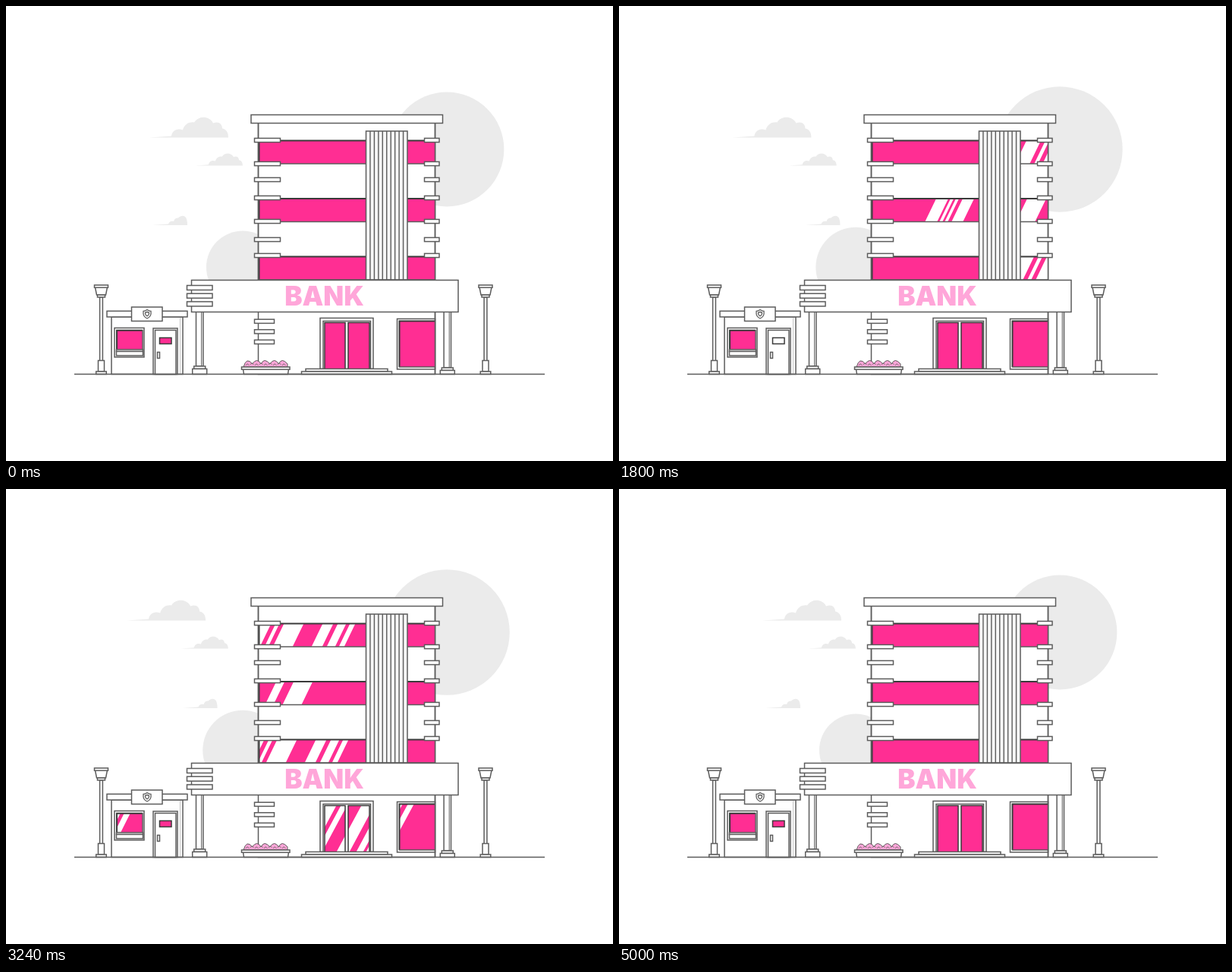
These frames come from a looping animation (800x600 px, 7000 ms). An HTML page:

```html
<!DOCTYPE html>
<html lang="en">
<head>
<meta charset="utf-8">
<title>Bank</title>
<style>
  html, body { margin: 0; width: 100%; height: 100%; overflow: hidden; background: #fff; }
  svg { display: block; width: 800px; height: 600px; }
  text { font: 900 35px Inter, "Open Sans", sans-serif; fill: #ffa6d9; }
</style>
</head>
<body>
<svg id="stage" viewBox="0 0 800 600"></svg>
<script>
const LOOP = 7000, END = 5000, STEP = 40, GROUND = 485.5;
const PINK = '#ff2e93', SOFT = '#ffa6d9', INK = '#5c5c5c', DARK = '#3a3a3a', GREY = '#ebebeb';
const stage = document.getElementById('stage');

function add(tag, attrs, parent = stage) {
  const el = document.createElementNS('http://www.w3.org/2000/svg', tag);
  for (const k in attrs) el.setAttribute(k, attrs[k]);
  parent.appendChild(el);
  return el;
}
const box = (x1, y1, x2, y2, fill = '#fff', stroke = INK) =>
  add('rect', { x: x1, y: y1, width: x2 - x1, height: y2 - y1, fill, stroke, 'stroke-width': 1.5 });
const line = (d, w = 1.5, stroke = INK, fill = 'none') =>
  add('path', { d, fill, stroke, 'stroke-width': w });
// Box around the centre line x, from y1 to y2
const post = (x, half, y1, y2) => box(x - half, y1, x + half, y2);
// Horizontal bar around the centre line y
const bar = (x1, x2, y, half = 2.6) => box(x1, y - half, x2, y + half);

// Sky
const sun = add('circle', { cx: 581, cy: 189, fill: GREY });
const moon = add('circle', { cx: 312, cy: 344.5, fill: GREY });
const puff = 'M0 0L29 -2C30 -9 36 -13 44 -10C46 -18 53 -21 59 -20C64 -29 79 -29 84 -19C91 -22 96 -18 96 -12C102 -11 104 -6 104 0Z';
const wisp = 'M0 0L21 -1.5C22 -5 25 -6 28 -5C29 -9 32 -10 34 -9.5C38 -14 44 -13 45 -8Q46 -5 46 0Z';
const cloud = (d, x, y, scale, reach) => ({ el: add('path', { d, fill: GREY }), x, y, scale, reach });
const clouds = [
  cloud(puff, 189, 173.5, 1, -41.5),
  cloud(puff, 249.5, 210.5, 0.6, -26.5),
  cloud(wisp, 193, 289, 1, 55)
];

/* Glass with slanted reflections. Bands are widths from the leading edge back,
   white and clear in turn; each launch sends them off from x, speeding up. */
const passes = [];
function glass(x1, y1, x2, y2, { runs, lean, x, gain, power, launches }) {
  const id = `clip${x1}-${y1}`;
  const area = { x: x1, y: y1, width: x2 - x1, height: y2 - y1 };
  add('rect', area, add('clipPath', { id }));
  const g = add('g', { 'clip-path': `url(#${id})` });
  add('rect', { ...area, fill: PINK }, g);
  let d = '', edge = 0;
  runs.forEach((w, i) => {
    if (i % 2 === 0) d += `M${edge} ${y2}l${lean} ${y1 - y2}h${-w}l${-lean} ${y2 - y1}Z`;
    edge -= w;
  });
  for (const launch of launches)
    passes.push({ el: add('path', { d, fill: '#fff' }, g), x, gain, power, launch });
}

// Main block
box(332.5, 154, 565.5, GROUND);
box(323, 143.5, 575.5, 154.5);

const outer = { runs: [7, 5, 11, 6, 14, 25, 26, 6, 5, 6, 19],
  lean: 15, x: 307, gain: 92, power: 2.25, launches: [0, 2040] };
const inner = { runs: [25, 12, 11, 47, 15, 5, 4, 3, 4, 3, 16],
  lean: 15, x: 315, gain: 40, power: 3, launches: [0, 2010] };
[outer, inner, { ...outer, x: outer.x - 9 }].forEach((shine, i) => {
  const y = 177 + i * 76.5, low = y + 31;
  glass(333, y, 565, low, shine);
  line(`M333.5 ${low}V${y + 0.5}H565`, 2, DARK);
  line(`M333 ${low}H565`);
});
line('M332.5 154V361M565.5 154V361');

// Fins
box(474.5, 165, 529, 361, '#f6f6f6');
for (let i = 1; i < 10; i++) line(`M${474.5 + i * 5.45} 165V361`, 1.4);

for (const y of [177, 208, 229, 253, 284, 308, 329]) {
  bar(327.5, 361.5, y);
  bar(551.5, 571, y);
}
for (let i = 0; i < 3; i++) bar(327.5, 353.5, 415.8 + i * 13.6);

// Entrance
box(414, 411.5, 484, 478.5);
box(418, 415.5, 480.5, 478.5);
for (const [a, b] of [[420, 447], [451, 479]]) {
  glass(a, 417, b, 478.5, { runs: [8, 4, 9, 9, 17, 19, 8, 6, 24],
    lean: 33, x: 375, gain: 152, power: 1.2, launches: [0, 2490] });
  line(`M${a} 478V417.5H${b}V478`, 1.5, DARK);
}
box(395, 478.5, 503, 482);
box(389.5, 482, 508.5, GROUND);

// Shop window
box(515.5, 412.5, 565.5, 479);
glass(518, 415, 565, 476, { runs: [8, 7, 10, 5, 11],
  lean: 33, x: 485, gain: 180, power: 1.2, launches: [600, 3080] });
line('M518.5 476V415.5H565', 2, DARK);
line('M518 476H565M565.5 403V485');

// Canopy
function pillar(x, y) {
  post(x, 4.7, 403, y);
  line(`M${x + 2.4} 403V${y}`, 1);
  post(x, 7.5, y, y + 3.5);
  post(x, 9.5, y + 3.5, GROUND);
}
pillar(255.2, 475);
pillar(581.8, 477);
box(244.5, 361.5, 596, 403.5);
for (let i = 0; i < 3; i++) bar(238.5, 272, 371.5 + i * 10.7, 3);
add('text', { x: 419.5, y: 395, 'text-anchor': 'middle' }).textContent = 'BANK';

// Planter
let bush = 'M313 476', buds = '';
for (let i = 0; i < 5; i++) bush += `q${i % 2 ? 6 : 4} ${i ? -9 : -14} 11.6 ${i ? 0 : -4}`;
line(bush + 'V476Z', 1, INK, SOFT);
for (let i = 0; i < 9; i++) buds += `M${316 + i * 6} ${474 - i % 2}q2 -4 4.5 0`;
line(buds, 0.8);
line(`M312.5 479L313.5 ${GROUND}H371.5L372.5 479Z`, 1.5, INK, '#fff');
box(310.5, 476, 374, 479.3);

// Kiosk
box(139, 410, 233, GROUND);
line('M229.5 410V485', 0.7, '#aaa');
box(133, 402.3, 239, 410);
box(165.5, 397, 206, 415.5);
const shield = s => `M186 ${406 - 5.5 * s}q${2.5 * s} ${1.8 * s} ${5 * s} ${1.8 * s}v${3.7 * s}` +
  `q${-s / 2} ${4 * s} ${-5 * s} ${6 * s}q${-4.5 * s} ${-2 * s} ${-5 * s} ${-6 * s}v${-3.7 * s}` +
  `q${2.5 * s} 0 ${5 * s} ${-1.8 * s}Z`;
line(shield(1) + shield(0.48), 1.3);
box(143, 424.5, 182, 463);
glass(146, 427, 180, 453, { runs: [8, 5, 9, 17, 24],
  lean: 13, x: 133, gain: 35, power: 2.2, launches: [0, 2500] });
line('M146 453V427.7H180', 2, DARK);
line('M180 427V453');
box(145.5, 453, 180.5, 455.5);
box(145.5, 455.5, 180.5, 461);
box(194, 425, 226, GROUND);
box(196.5, 427.5, 224, GROUND);
glass(202.5, 437.5, 218, 445.5, { runs: [8, 10, 32],
  lean: 4, x: 190, gain: 20.3, power: 1.7, launches: [0, 2780] });
box(202.5, 437.5, 218, 445.5, 'none', DARK);
box(199.5, 456.5, 202.5, 464.5);

// Street
function lamp(x) {
  post(x, 1.9, 384, 468);
  line(`M${x - 8} 371H${x + 8}L${x + 6} 381H${x - 6}Z`, 1.5, INK, '#fff');
  post(x, 5, 381, 384);
  post(x, 9, 368, 371.3);
  post(x, 4, 467.5, 482);
  post(x, 6.8, 482, GROUND);
}
lamp(125.5);
lamp(632);
line(`M90 ${GROUND}H710`, 1.6);

// Motion
const mix = (a, b, u) => a + (b - a) * u;
const ease = (t, from, to) => {
  const u = Math.min(1, Math.max(0, (t - from) / (to - from)));
  return (1 - Math.cos(Math.PI * u)) / 2;
};
// Swells to a peak, returns to a dip, then again
function sunRadius(t) {
  const dip = 2450;
  return t < dip
    ? mix(mix(75.4, 89.2, ease(t, 0, 1090)), 77, ease(t, 1090, dip))
    : mix(mix(77, 89.4, ease(t, dip, 4100)), 75.4, ease(t, 4100, END));
}
function draw(now) {
  const t = Math.min(END, Math.floor(now % LOOP / STEP) * STEP);
  const r = sunRadius(t), drift = ease(t, 0, 2090) - ease(t, 2270, END);
  sun.setAttribute('r', r);
  moon.setAttribute('r', r * 0.637);
  for (const c of clouds)
    c.el.setAttribute('transform', `translate(${c.x + c.reach * drift} ${c.y}) scale(${c.scale})`);
  for (const p of passes) {
    const s = Math.max(0, t - p.launch) / 1000;
    p.el.setAttribute('transform', `translate(${p.x + p.gain * s ** p.power} 0)`);
  }
}
const start = performance.now();
function tick() {
  draw(performance.now() - start);
  requestAnimationFrame(tick);
}
tick();
</script>
</body>
</html>
```
